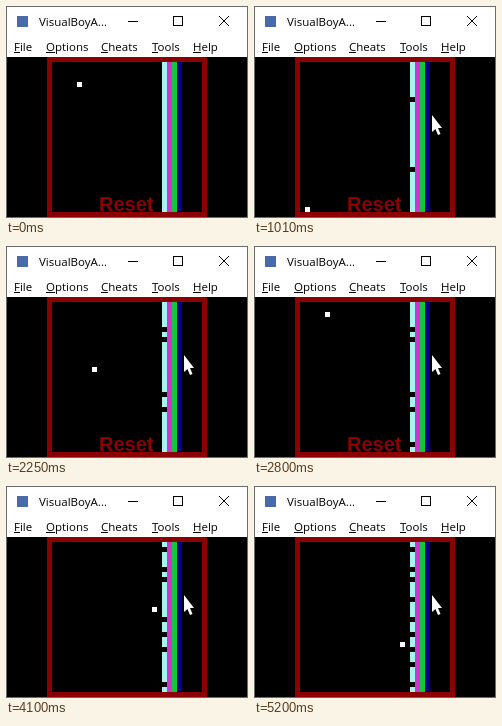
Animation, 242 px wide and 212 px high, one loop 5.28 s. Source, as an HTML page with a canvas:

```html
<!DOCTYPE html>
<html lang="en">
<head>
<meta charset="utf-8">
<style>
html, body { margin: 0; width: 100%; height: 100%; overflow: hidden; background: #000; }
canvas { display: block; }
</style>
</head>
<body>
<canvas id="stage" width="242" height="212"></canvas>
<script>
const ctx = document.getElementById('stage').getContext('2d');
const LOOP = 5280, STEP = LOOP / 68;
const CELL = 5, LEFT = 46, TOP = 56, ROWS = 30, WALL = 22;
const FIRST_HIT = 17, LAP = 46;
const UI = '11.5px "Open Sans", "Noto Sans", sans-serif';
const RED = '#8b0000';
const STRIPES = ['#a4f4f0', '#cc38cc', '#10c83c', '#00008b'];

function rect(x, y, w, h, color) {
  ctx.fillStyle = color;
  ctx.fillRect(x, y, w, h);
}

function cell(col, row, color) {
  rect(LEFT + col * CELL, TOP + row * CELL, CELL, CELL, color);
}

function text(str, x, y, font, color) {
  ctx.font = font;
  ctx.fillStyle = color;
  ctx.fillText(str, x, y);
}

// The game runs slightly slower in the middle of the loop.
function tickAt(step) {
  if (step < 29) return Math.round(step * 187 / 29);
  if (step < 43) return Math.round(187 + (step - 29) * 85 / 14);
  return Math.round(272 + (step - 43) * 157 / 24);
}

function colAt(tick) {
  const away = Math.abs((tick - FIRST_HIT + LAP * 1.5) % LAP - LAP / 2);
  return Math.max(0, WALL - away);
}

function rowAt(tick) {
  const phase = (tick + 4) % 59;
  if (phase >= ROWS) return 59 - phase;
  // After a bounce off the top the ball is one row late at first.
  const late = tick > phase && phase < ROWS / 2;
  return Math.max(0, late ? phase - 1 : phase);
}

function drawWindow() {
  rect(0, 0, 242, 212, '#6b6b6b');
  rect(1, 1, 240, 50, '#fff');
  rect(1, 51, 240, 160, '#000');
  rect(11, 10, 11, 11, '#4a6aa8');
  text('VisualBoyA...', 33, 20, UI, '#000');

  rect(122, 15, 10, 1, '#000');
  ctx.strokeStyle = '#000';
  ctx.strokeRect(167.5, 10.5, 9, 9);
  ctx.beginPath();
  ctx.moveTo(213, 10); ctx.lineTo(223, 20);
  ctx.moveTo(223, 10); ctx.lineTo(213, 20);
  ctx.stroke();

  const menu = { File: 8, Options: 40, Cheats: 95, Tools: 146, Help: 187 };
  for (const [name, x] of Object.entries(menu)) {
    text(name, x, 45, UI, '#000');
    rect(x, 46, Math.round(ctx.measureText(name[0]).width), 1, '#000');
  }
}

function drawCursor() {
  ctx.fillStyle = '#fff';
  ctx.fill(new Path2D('M178 109V126L181.5 123L184 129L186.5 128L184 122H188Z'));
}

function draw(ms) {
  const step = Math.floor((ms + 16) / STEP), tick = tickAt(step);
  drawWindow();
  rect(41, 51, 160, 160, RED);
  rect(LEFT, TOP, 150, 150, '#000');
  STRIPES.forEach((color, i) =>
    rect(LEFT + (WALL + i) * CELL, TOP, CELL, ROWS * CELL, color));
  for (let hit = FIRST_HIT; hit <= tick; hit += LAP) cell(WALL, rowAt(hit), '#000');
  if (step < 39) text('Reset', 93, 205, 'bold 20px "Liberation Sans", Arial, sans-serif', RED);
  cell(colAt(tick), rowAt(tick), '#fff');
  if (step > 0) drawCursor();
}

const begin = performance.now();
function loop() {
  draw((performance.now() - begin) % LOOP);
  requestAnimationFrame(loop);
}
loop();
</script>
</body>
</html>
```
